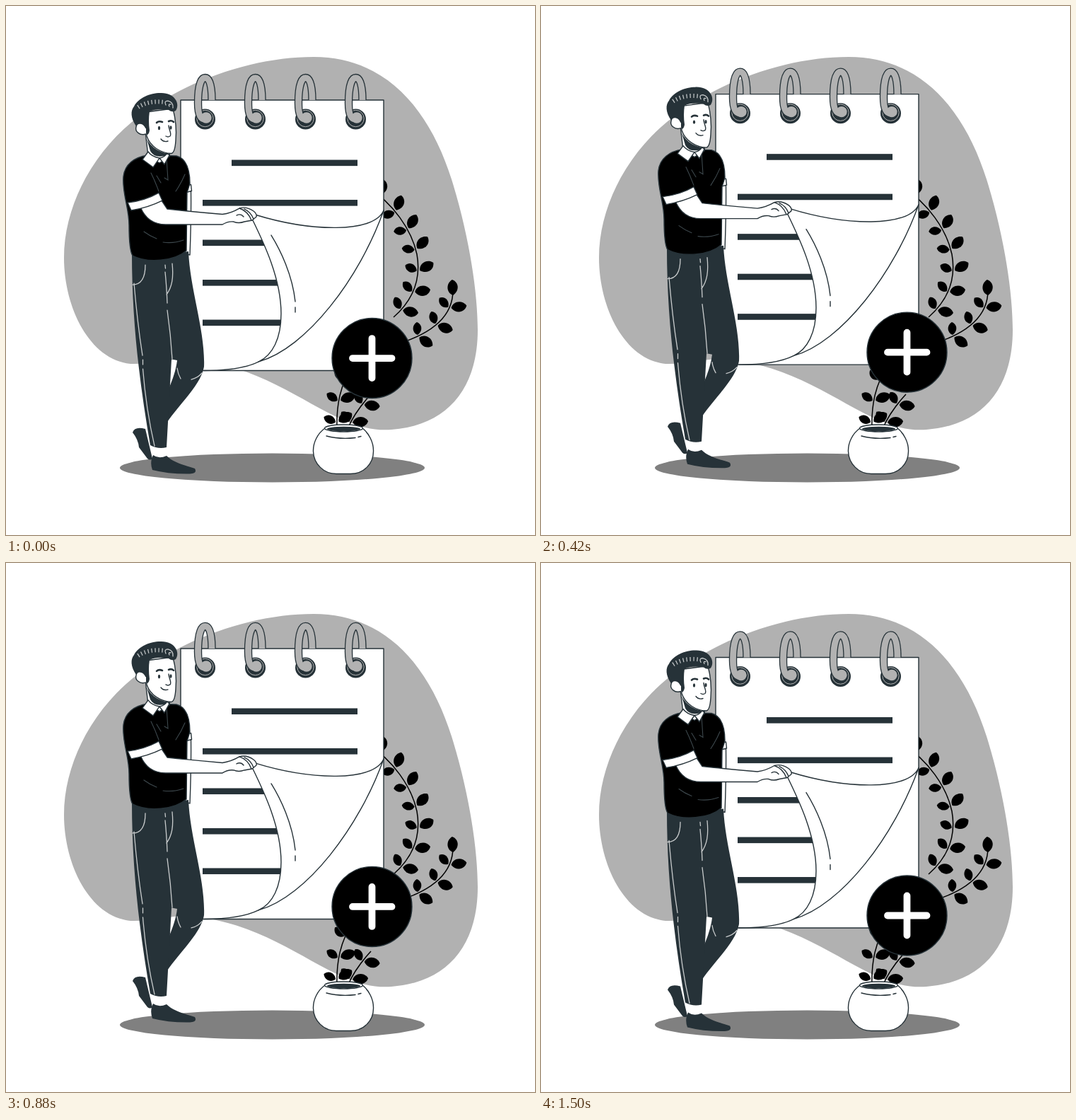
Animation, 748 px wide and 748 px high, one loop 1540 ms. Source, as an HTML page:

```html
<!DOCTYPE html>
<html lang="en">
<head>
<meta charset="utf-8">
<title>Floating notepad</title>
<style>
html, body { margin: 0; width: 100%; height: 100%; overflow: hidden; background: #fff; }
svg { display: block; width: 100vw; height: 100vh; }
.ink { fill: #263238; }
.paper { fill: #fff; stroke: #263238; stroke-width: 1.4; stroke-linejoin: round; }
.line { fill: none; stroke: #263238; stroke-width: 1.4; stroke-linecap: round; }
.bold { stroke-width: 2.6; }
.shirt { stroke: #263238; stroke-width: 1.4; }
.seam { fill: none; stroke: #c9cccd; stroke-width: 1.3; stroke-linecap: round; }
.ticks { fill: none; stroke: #c9cccd; stroke-width: 6; stroke-dasharray: 1.2 3.8; }
.crease { fill: none; stroke: #3d484d; stroke-width: 1.1; stroke-linecap: round; }
.stem { fill: none; stroke: #000; stroke-width: 1.5; }
</style>
</head>
<body>
<svg viewBox="0 0 748 748">
  <defs>
    <path id="tube" d="M291 133C291 113 288 101.500 281.500 101.500C274 101.500 271.500 120 271.500 137C271.500 152 274 160 281 160" fill="none"/>
    <g id="ring">
      <circle class="ink" cx="281.500" cy="160" r="14.500"/>
      <circle cx="281.500" cy="159" r="11.700" fill="none" stroke="#b2b2b2"/>
      <circle class="ink" cx="283" cy="158" r="9"/>
      <use href="#tube" stroke="#263238" stroke-width="11.400"/>
      <circle cx="283" cy="158" r="7.700" fill="#b2b2b2"/>
      <use href="#tube" stroke="#b2b2b2" stroke-width="8.800"/>
    </g>
  </defs>

  <path fill="#b1b1b1" d="M435 72C540 72 600 150 630 245C655 325 667 405 667 458C667 540 625 593 545 599C460 606 395 512 260 499C232 498 206 507 176 506C118 500 82 426 82 356C82 285 120 212 178 164C250 105 350 72 435 72Z"/>
  <ellipse cx="376.500" cy="653" rx="215.500" ry="20.500" fill="#808080"/>
  <g id="plant"></g>

  <g id="pot">
    <path class="paper" d="M451 597C441 604 434 617 434.500 630C435 647 449 661.500 467 661.500H487C506 661.500 519.500 647 519.500 630C520 617 513 604 504 597Z"/>
    <ellipse class="paper" cx="477.500" cy="597" rx="27" ry="5"/>
    <ellipse class="ink" cx="477.500" cy="598" rx="23.500" ry="3.300"/>
    <path class="line" d="M453 608Q472 613 494 610.500M498 609.500L502 608.500"/>
  </g>

  <g id="float">
    <rect class="paper" x="247" y="133" width="287" height="382.500"/>
    <g id="bars"></g>
    <path class="paper" d="M347 299C362 330 389 383 389 435C389 470 377 494 357 503C425 484 500 385 534 289C520 322 430 319 352 295Z"/>
    <path class="line" d="M357 503Q332 515.500 280 515.500M375 324C388 345 405 380 409 418M409 426V433"/>
    <g id="rings"></g>

    <!-- far arm -->
    <path class="paper" d="M254 262H261.500Q262 300 260 352L253 350Z"/>
    <path class="paper" d="M252 254L261.500 252.500L262.500 261.500L253 264Z"/>

    <!-- legs and shoes -->
    <path class="ink" d="M179 603Q182 594 197 598L207 640Q204 643 200 640L188 624Q187 613 179 603Z"/>
    <path class="ink" d="M222 352L258 347C260 400 282 460 280 510C276 535 246 562 228 588L227 548Q240 520 242 501L232 499Z"/>
    <path fill="#fff" d="M205 619L227 622L228 641L208 641Z"/>
    <path class="ink" d="M206 640L208 635Q216 641 227 636C237 646 255 650 267 654Q271 661 260 661.500Q230 662 207 656Q204 648 206 640Z"/>
    <path class="ink" d="M178 350L236 355L229 420Q238 470 234 500L227 624Q215 627 204 621C190 540 178 450 178 350Z"/>
    <path class="seam" d="M181 392Q186 450 193 494M193.500 500V507M193.500 513Q198 570 210 622M179 394C191 394 197 384 197 366M225 366L225.500 371M225 376Q227 395 228 420M228 430Q233 465 235 499M235 364C237 384 235 397 227 408M242 512Q243 520 247 527M262 528Q271 526 277 519"/>

    <!-- shirt -->
    <path class="shirt" d="M200 211C181 214 168 224 166 241C164 265 174 285 174 310Q174 345 179 353C200 364 238 361 255 346L256 264L260 251C260 234 256 216 241 212Z"/>
    <path class="crease" d="M205 236Q211 248 216 262M213 240L219 250M227 216L229 246L224 243M195 319Q203 325 213 329M222 334Q237 336 251 331M253 238Q248 250 240 262"/>

    <!-- neck and collar -->
    <path class="paper" d="M197 178L201 212L217 222L231 213L232 200Z"/>
    <path class="ink" d="M199 188Q209 207 233 209Q211 218 204 205Z"/>
    <path class="paper" d="M201 206L193 217L208 228L217 215Q206 213 201 206ZM217 215L224 224L231 211L228 208Q224 214 217 215Z"/>

    <!-- head -->
    <path class="paper" d="M198 150L236 145Q242 168 240 190Q239 207 234 208.500C219 208 204 199 199 184Z"/>
    <path class="ink" d="M184 170C176 158 176 148 181 142C187 130 204 123 218 123C238 122 247 138 240 148Q235 151 230 147Q214 144 203 149Q201 162 203 176Q202 182 199 182L196 169Z"/>
    <path class="paper" d="M198 173C194 164 185 164 184 171C182 177 189 184 198 181"/>
    <path class="ticks" d="M187 143Q202 133 224 136"/>
    <path class="seam" d="M226 140Q223 134 229 134Q237 136 236 144M231 142Q229 138 233 139"/>
    <path class="line" d="M230 169C230 175 235 181 232 184Q229 186 226 184M219 188Q223 193 229 191"/>
    <path class="line bold" d="M213 165Q216 162 221 164M230 163Q234 161 237 164"/>
    <ellipse class="ink" cx="216.500" cy="172.500" rx="1.600" ry="2.700"/>
    <ellipse class="ink" cx="233" cy="172" rx="1.600" ry="2.700"/>

    <!-- near arm and hand -->
    <path class="paper" d="M190 284C196 299 208 309 226 309H306Q314 304 322 305Q329 308 337 305L348 303L354 298Q355 294 350 290Q340 283 330 286Q318 293 306 294.500Q265 291 228 287L218 272Z"/>
    <path class="line" d="M330 286Q342 290 347 303M337 287Q346 291 350 301M326 296Q332 293 336 298"/>
    <path class="paper" d="M172 278Q197 275 216 264L221 275Q201 285 177 289Z"/>

    <!-- add button -->
    <circle class="shirt" cx="517.500" cy="498" r="56.500"/>
    <path d="M490 498H545.500M517.500 470V526" stroke="#fff" stroke-width="9.800" stroke-linecap="round"/>
  </g>
</svg>
<script>
const NS = 'http://www.w3.org/2000/svg';
const $ = id => document.getElementById(id);
const add = (parent, tag, attrs) => {
  const el = document.createElementNS(NS, tag);
  for (const k in attrs) el.setAttribute(k, attrs[k]);
  return parent.appendChild(el);
};

for (let i = 0; i < 4; i++) add($('rings'), 'use', { href: '#ring', x: i * 71 });

for (let i = 0; i < 5; i++) {
  const x = i ? 278 : 319, end = i < 2 ? 497 : 395;
  add($('bars'), 'rect', { class: 'ink', x, y: 217.5 + i * 56.5, width: end - x, height: 8.6 });
}

// A leaf that grows from a point on the stem.
function leaf({ x, y }, angle, reach, size) {
  add($('plant'), 'path', {
    d: 'M-1 0C-.7-.85.5-.95 1-.1C.7.75-.4.9-1 0Z',
    transform: `translate(${x} ${y}) rotate(${angle}) translate(${reach}) scale(${size})`
  });
}

// Pairs of leaves at even steps from the tip of the stem down.
function sprig(d, first) {
  const stem = add($('plant'), 'path', { class: 'stem', d });
  const length = stem.getTotalLength();
  for (let s = first; s < length; s += 30.5) {
    const p = stem.getPointAtLength(s), q = stem.getPointAtLength(s - 2);
    const angle = Math.atan2(q.y - p.y, q.x - p.x) * 180 / Math.PI;
    leaf(p, angle + 60, 14, 11);
    leaf(p, angle - 65, 11, 9);
  }
}

sprig('M508 254C548 278 574 318 581 351C588 390 573 418 548 440', 27);
sprig('M632 402C632 436 606 462 553 478', 26);
sprig('M492 506C472 535 467 565 468 598', 27);
sprig('M516 549Q493 574 483 598', 19);
leaf({ x: 632, y: 398 }, -90, 0, 11);

const LOOP = 1540, STEP = 1000 / 24, PEAK = 738, RISE = 14.8, SPEED = 0.0201;
const start = performance.now();

// Straight rise and fall, held on 24 steps per second.
function draw(now) {
  const t = Math.floor((Math.max(0, now - start) % LOOP + 4) / STEP) * STEP;
  const y = SPEED * Math.abs(t - PEAK) - RISE;
  $('float').setAttribute('transform', `translate(0 ${y.toFixed(2)})`);
  requestAnimationFrame(draw);
}
draw(start);
</script>
</body>
</html>
```
